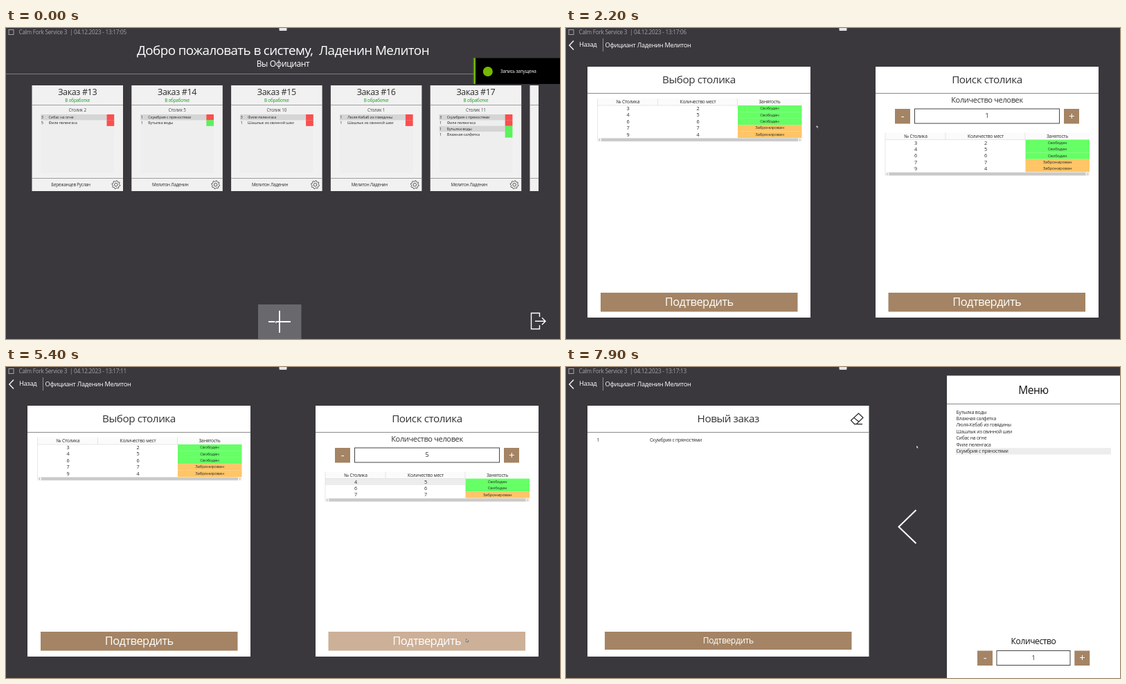
Recreate the animation shown at these times as an HTML page. Size 800 px wide and 450 px high, loop 8000 ms.

```html
<!DOCTYPE html>
<html lang="ru">
<head>
<meta charset="utf-8">
<title>Заказы</title>
<style>
  html, body { margin: 0; width: 100%; height: 100%; overflow: hidden; background: #3a383d; }
  svg { display: block; width: 100vw; height: 100vh; }
  text { font-family: "Open Sans", "Noto Sans", sans-serif; letter-spacing: -0.03em; white-space: pre; }
</style>
</head>
<body>
<svg viewBox="0 0 800 450">
  <g id="scene"></g>
  <g id="toast"></g>
  <path id="cursor" d="M0 0V4.2L1.1 3.3L1.9 5L2.7 4.6L2 3H3.4Z" fill="#fff" stroke="#222" stroke-width=".5"/>
</svg>
<script>
const LOOP = 8000;
const BROWN = '#a48464', BROWN_HOVER = '#cdb098', INK = '#2b2b2b';
const RED = '#f94f4f', GREEN = '#5bf25b', FREE = '#66ff66', BOOKED = '#ffc566';
const WAITER = 'Ладенин Мелитон', WAITER_SHORT = 'Мелитон Ладенин', OTHER = 'Бережанцев Руслан';
const DISHES = ['Бутылка воды', 'Влажная салфетка', 'Люля-Кебаб из говядины',
  'Шашлык из свинной шеи', 'Сибас на огне', 'Филе пеленгаса', 'Скумбрия с пряностями'];

// order number, table, waiter, [quantity, dish] pairs
const ORDERS = [
  [13, 2, OTHER, [[3, 4], [5, 5]]],
  [14, 5, WAITER_SHORT, [[1, 6], [1, 0]]],
  [15, 10, WAITER_SHORT, [[3, 5], [1, 3]]],
  [16, 1, WAITER_SHORT, [[1, 2], [1, 3]]],
  [17, 11, WAITER_SHORT, [[3, 6], [1, 5], [1, 0], [1, 1]]],
  [18, 4, WAITER_SHORT, []]
];
// table number, seats, booked
const TABLES = [[3, 2, 0], [4, 5, 0], [6, 6, 0], [7, 7, 1], [9, 4, 1]];

const CLOCK = [[0, 5], [1100, 6], [2300, 7], [4000, 10], [5000, 11], [6000, 12], [7050, 13]];
const PEOPLE = [[0, 1], [2500, 2], [2700, 3], [2800, 4], [3000, 5]];
const SCREEN = [[0, 'orders'], [300, 'tables'], [5600, 'menu']];
const ROW_PICK = [[0, ''], [4200, 'active'], [5300, 'idle']];
const DISH_PICK = [[0, ''], [6500, 'active'], [7150, 'idle']];
const CURSOR = [[0, 388.5, 424], [700, 388.5, 424], [1500, 345, 170], [2200, 361.5, 140.5],
  [2400, 728, 127], [3200, 728, 127], [4100, 678.5, 165.5], [4400, 678.5, 165.5],
  [5100, 664.5, 393.5], [5600, 664.5, 393.5], [6400, 605, 120], [6600, 605, 120],
  [6900, 514.8, 192.5], [7100, 494, 229], [7250, 494, 229], [7900, 506, 113.5]];

const $ = id => document.getElementById(id);
const clamp = v => Math.max(0, Math.min(1, v));
const smooth = v => v * v * (3 - 2 * v);
const at = (steps, t) => steps.filter(s => s[0] <= t).pop()[1];

const rect = (x, y, w, h, fill, extra = '') =>
  `<rect x="${x}" y="${y}" width="${w}" height="${h}" fill="${fill}" ${extra}/>`;
const text = (x, y, size, str, fill = INK, anchor = 'start') =>
  `<text x="${x}" y="${y}" font-size="${size}" fill="${fill}" text-anchor="${anchor}">${str}</text>`;
const mid = (x, y, size, str, fill) => text(x, y, size, str, fill, 'middle');
const path = (d, stroke, width = 1) =>
  `<path d="${d}" fill="none" stroke="${stroke}" stroke-width="${width}"/>`;

function gear(cx, cy) {
  let d = '';
  for (let i = 0; i < 32; i++) {
    const a = (i + 0.5) * Math.PI / 16, r = i % 4 < 2 ? 6 : 4.7;
    d += (i ? 'L' : 'M') + (cx + r * Math.cos(a)).toFixed(2) + ' ' + (cy + r * Math.sin(a)).toFixed(2);
  }
  return path(d + 'Z', '#333', 0.8) +
    `<circle cx="${cx}" cy="${cy}" r="2.3" fill="none" stroke="#333" stroke-width=".8"/>`;
}

function titleBar(sec) {
  const grey = '#a3a2a5';
  return rect(4, 2.5, 7, 7, 'none', `stroke="${grey}"`) +
    text(18.5, 9, 8.2, 'Calm Fork Service 3', grey) + text(92, 9, 8.2, '|', grey) +
    text(98, 9, 8.2, '04.12.2023 - 13:17:' + String(sec).padStart(2, '0'), grey) +
    rect(394.5, -1, 11, 5, '#e4e4e4', 'rx="1"');
}

function card([num, table, waiter, rows], i) {
  const x = 37.5 + i * 143.8;
  let s = rect(x, 83, 131.5, 153, '#f1f1f1') + rect(x + 13, 125, 105.5, 85, '#eeeeee') +
    mid(x + 65.7, 97, 12.5, 'Заказ #' + num) +
    mid(x + 65.7, 107, 6.3, 'В обработке', '#159a1e') +
    mid(x + 65.7, 121, 6.3, 'Столик ' + table, '#444') +
    path(`M${x} 111.5h131.5M${x} 217.5h131.5`, '#8a8a8a', 0.8) +
    mid(x + 56, 229, 6.2, waiter) + gear(x + 121.4, 226.8);
  rows.forEach(([qty, dish], k) => {
    const y = 125 + k * 8.35;
    if (k % 2 === 0) s += rect(x + 13, y, 95, 8.35, '#d5d5d5');
    s += rect(x + 108, y, 10.7, 8.5, dish < 2 ? GREEN : RED) +
      text(x + 13.3, y + 6.1, 5.6, qty) + text(x + 24, y + 6.1, 5.6, DISHES[dish]);
  });
  return s;
}

function ordersScreen() {
  return mid(400, 39, 18.8, `Добро пожаловать в систему,  ${WAITER}`, '#fff') +
    mid(400, 55.5, 12, 'Вы Официант', '#fff') +
    path('M0 66.5H800', '#7d7c80') +
    `<clipPath id="view"><rect x="30" y="80" width="739" height="160"/></clipPath>` +
    `<g clip-path="url(#view)">${ORDERS.map(card).join('')}</g>` +
    rect(364, 400, 62.5, 50, '#69686d') +
    path('M379 425H411M395 409V441', '#fff', 1.8) +
    path('M770.5 418V412.5H758.5V435.5H770.5V430M764 424.3H779M774 419.3L779 424.3L774 429.3', '#fff', 1.4);
}

function backBar() {
  return path('M11 18.5L4.8 25L11 31.5', '#fff', 1.3) + text(19, 27.3, 9.2, 'Назад', '#fff') +
    path('M53.5 15V34', '#8d8c90') + text(56.5, 28, 9.2, 'Официант ' + WAITER, '#fff');
}

function panel(x, w, title) {
  return rect(x, 56, w, 363, '#fff') + mid(x + w / 2, 80, 15.3, title, '#333') +
    path(`M${x} 94.5h${w}`, '#8a8a8a');
}

const button = (x, y, w, h, size, label, hot) =>
  rect(x, y, w, h, hot ? BROWN_HOVER : BROWN) + mid(x + w / 2, y + h / 2 + size * 0.33, size, label, '#fff');

function stepper(x, y, boxX, boxW, plusX, value, hot) {
  return button(x, y, 22, 21.5, 15, '-') + button(plusX, y, 22, 21.5, 15, '+', hot) +
    rect(boxX, y, boxW, 21, '#fff', 'stroke="#444"') + mid(boxX + boxW / 2, y + 13.4, 9, value);
}

function grid(x, y, tables, pick) {
  const bottom = y + 10 + tables.length * 9.4;
  let s = rect(x, y, 295, 10, '#fbfbfb') +
    mid(x + 44, y + 7.3, 6.7, '№ Столика') + mid(x + 145, y + 7.3, 6.7, 'Количество мест') +
    mid(x + 248.5, y + 7.3, 6.7, 'Занятость');
  tables.forEach(([num, seats, booked], i) => {
    const ry = y + 10 + i * 9.4, on = i === 0 && pick;
    const ink = on === 'active' ? '#fff' : INK;
    if (on) s += rect(x, ry, 202, 9.4, on === 'active' ? '#0078d7' : '#ededed');
    s += mid(x + 44, ry + 7, 7.3, num, ink) + mid(x + 145, ry + 7, 7.3, seats, ink) +
      rect(x + 202.5, ry, 92.5, 9.5, booked ? BOOKED : FREE) +
      mid(x + 248.5, ry + 6.2, 6.1, booked ? 'Забронирован' : 'Свободен');
  });
  return s + path(`M${x} ${y}V${bottom + 5}M${x + 87} ${y}v10M${x + 202} ${y}v10M${x} ${y + 10}h202`, '#dcdcdc', 0.7) +
    rect(x, bottom, 295, 5.5, '#f0f0f0') + rect(x + 5.5, bottom + 0.6, 284, 4.2, '#c9c9c9') +
    path(`M${x + 3.5} ${bottom + 1.5}l-1.3 1.3l1.3 1.3M${x + 291.5} ${bottom + 1.5}l1.3 1.3l-1.3 1.3`, '#777', 0.6);
}

function tablesScreen(st) {
  return backBar() + panel(31, 322, 'Выбор столика') + panel(447, 322, 'Поиск столика') +
    grid(45.5, 102, TABLES) +
    mid(608, 108, 11, 'Количество человек', '#333') +
    stepper(475, 117, 503.5, 209, 719, st.people, st.plusHot) +
    grid(461, 151.5, TABLES.filter(r => r[1] >= st.people), st.row) +
    button(50, 383, 284.5, 27.5, 16.4, 'Подтвердить') +
    button(465.5, 383, 284.5, 27.5, 16.4, 'Подтвердить', st.confirmHot);
}

function menuScreen(st) {
  let s = backBar() + panel(31, 406.5, 'Новый заказ') +
    path('M416.5 82.5L411.5 77.3L422.5 67L429 73.2L419.5 82.5ZM415.8 73.4L423 79.3M416 82.7H428', '#222', 1.2) +
    button(56, 383, 356.5, 26, 12.1, 'Подтвердить') +
    path('M505.5 207L480.5 231.2L505.5 255.3', '#fff', 2) +
    rect(550, 12.5, 250, 437.5, '#fff') + mid(675, 39, 15.5, 'Меню', '#111') +
    path('M550 53.5H800', '#8a8a8a');
  DISHES.forEach((name, i) => {
    const y = 60.8 + i * 9.4, pick = i === 6 && st.dish;
    if (pick) s += rect(562.5, y, 224.5, 9.4, pick === 'active' ? '#0078d7' : '#ededed');
    s += text(563.5, y + 6.8, 6.8, name, pick === 'active' ? '#fff' : INK);
  });
  if (st.dish === 'idle') s += text(44.5, 108, 6.8, '1') + text(121, 108, 6.8, DISHES[6]);
  return s + mid(675, 401, 12, 'Количество', '#111') + stepper(594, 410.5, 622, 106, 734.3, 1);
}

const SCREENS = { orders: ordersScreen, tables: tablesScreen, menu: menuScreen };

$('toast').innerHTML = rect(678, 43.5, 122, 37.5, '#000') +
  path('M677 43.5V81', '#76b900', 2) +
  '<path d="M675.4 43.5V81" stroke="#76b900" stroke-width="1.4" stroke-dasharray="1.2 1"/>' +
  '<circle cx="695.8" cy="63" r="7" fill="#76b900"/>' +
  text(714, 65.3, 6.4, 'Запись запущена', '#fff');

function cursorAt(t) {
  const i = CURSOR.findIndex(p => p[0] > t);
  if (i < 0) return CURSOR[CURSOR.length - 1].slice(1);
  const [t0, x0, y0] = CURSOR[i - 1], [t1, x1, y1] = CURSOR[i];
  const k = smooth((t - t0) / (t1 - t0));
  return [x0 + (x1 - x0) * k, y0 + (y1 - y0) * k];
}

let shown = '';
function draw(t) {
  const [x, y] = cursorAt(t);
  const over = (l, top, r, b) => x >= l && x <= r && y >= top && y <= b;
  const st = {
    screen: at(SCREEN, t), sec: at(CLOCK, t), people: at(PEOPLE, t),
    row: at(ROW_PICK, t), dish: at(DISH_PICK, t),
    plusHot: over(719, 117, 741, 138), confirmHot: over(465, 383, 750, 411)
  };
  const key = JSON.stringify(st);
  if (key !== shown) {
    $('scene').innerHTML = rect(0, 0, 800, 450, '#3a383d') + titleBar(st.sec) + SCREENS[st.screen](st);
    shown = key;
  }
  $('toast').setAttribute('transform', `translate(${130 * smooth(clamp((t - 1000) / 350))} 0)`);
  $('cursor').setAttribute('transform', `translate(${x} ${y})`);
}

const start = performance.now();
function tick() {
  draw((performance.now() - start) % LOOP);
  requestAnimationFrame(tick);
}
tick();
</script>
</body>
</html>
```
